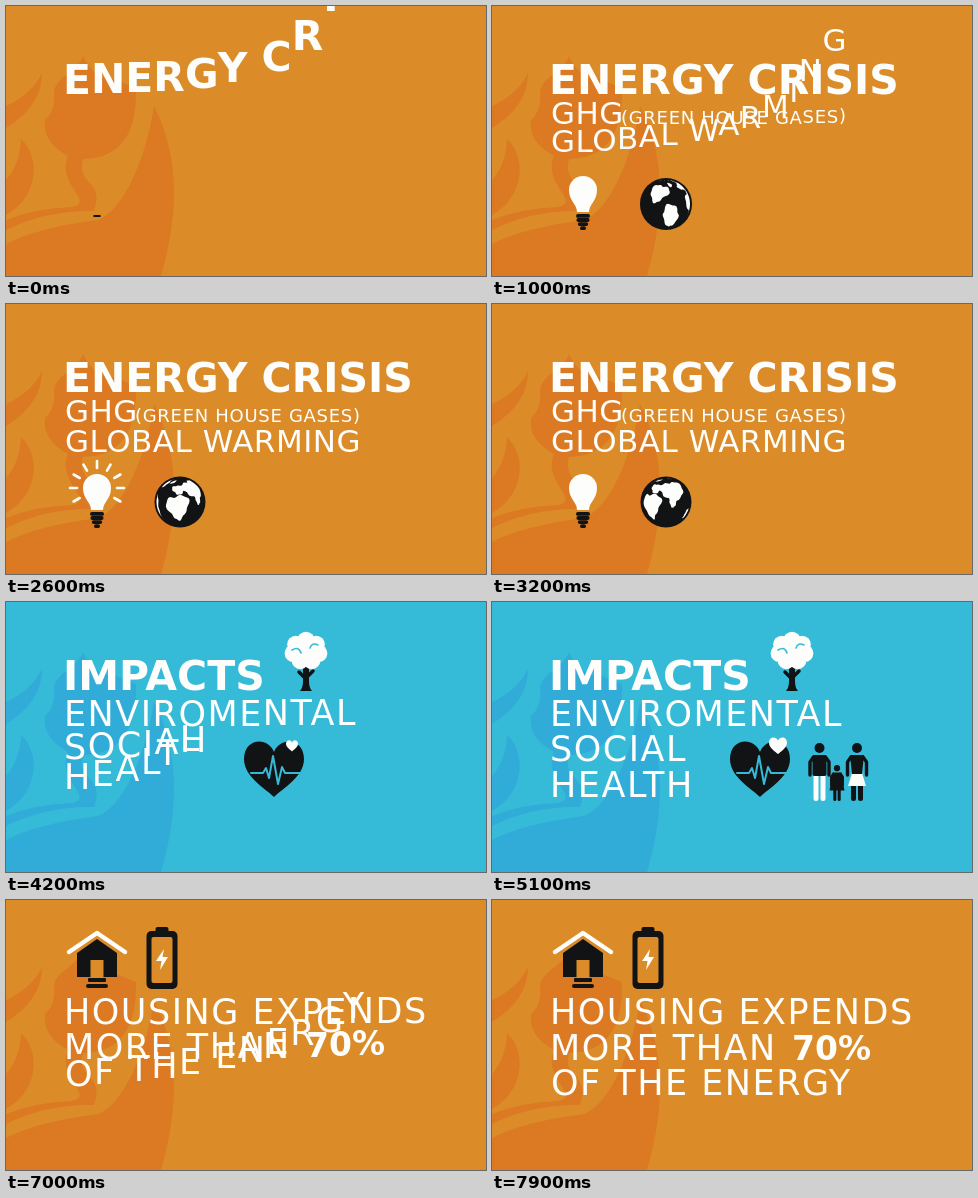
These frames come from a looping animation (480 px wide and 270 px high, 8 s). An HTML page with a canvas:

```html
<!DOCTYPE html>
<html lang="en">
<head>
<meta charset="utf-8">
<title>Energy crisis</title>
<style>
html, body { margin: 0; width: 100%; height: 100%; overflow: hidden; background: #db8c28; }
canvas { display: block; width: 480px; height: 270px; }
</style>
</head>
<body>
<canvas id="stage" width="480" height="270"></canvas>
<script>
const ctx = document.getElementById('stage').getContext('2d');
const LOOP = 8000, CUT_BLUE = 3500, CUT_HOUSE = 6400;
const WHITE = '#fdfdfb', BLACK = '#121314';
const ORANGE = { back: '#db8c28', flame: '#db7a23' };
const BLUE = { back: '#35bad8', flame: '#31acd8' };
const TAU = 70, DROP = 250;

// weight, size, tracking
const TITLE = ['bold', 41, 0], LIST = ['normal', 35, 1.5];
const SUB = ['normal', 31, 0.5], NOTE = ['normal', 18, 0.7], FIGURE = ['bold', 33, 0];

// ---------- helpers ----------
const clamp = v => Math.max(0, Math.min(1, v));

// grows from 0 to 1 with a slight overshoot
function pop(t, start, dur = 350) {
  const p = clamp((t - start) / dur) - 1;
  return 1 + 2.4 * p ** 3 + 1.4 * p ** 2;
}

function scaled(x, y, s, draw) {
  if (s <= 0) return;
  ctx.save();
  ctx.translate(x, y);
  ctx.scale(s, s);
  draw();
  ctx.restore();
}

function fill(d, color) {
  ctx.fillStyle = color;
  ctx.fill(new Path2D(d));
}

function stroke(d, width, color) {
  ctx.strokeStyle = color;
  ctx.lineWidth = width;
  ctx.lineCap = ctx.lineJoin = 'round';
  ctx.stroke(new Path2D(d));
}

function disc(x, y, r, color) {
  ctx.fillStyle = color;
  ctx.beginPath();
  ctx.arc(x, y, r, 0, 7);
  ctx.fill();
}

// box centred on x
function box(x, y, w, h, r, color) {
  ctx.fillStyle = color;
  ctx.beginPath();
  ctx.roundRect(x - w / 2, y, w, h, r);
  ctx.fill();
}

// letters drop in one after another and settle exponentially
function line(t, text, x, y, [weight, size, track], start, gap) {
  ctx.font = `${weight} ${size}px "DejaVu Sans", sans-serif`;
  ctx.fillStyle = WHITE;
  let n = 0;
  [...text].forEach((ch, i) => {
    if (ch === ' ') return;
    const age = t - start - gap * n++;
    if (age < 0) return;
    const left = ctx.measureText(text.slice(0, i + 1)).width - ctx.measureText(ch).width;
    ctx.fillText(ch, x + left + i * track, y - DROP * Math.exp(-age / TAU));
  });
}

function backdrop({ back, flame }) {
  ctx.fillStyle = back;
  ctx.fillRect(0, 0, 480, 270);
  fill('M36 67Q36 100 0 122V100Q26 88 36 67Z', flame);
  fill('M15 133C34 150 34 190 0 209V174Q14 158 15 133Z', flame);
  fill('M77 50Q88 74 108 73L130 82Q132 152 77 153C70 180 100 174 88 205Q40 204 0 224V214' +
    'Q30 202 66 201C90 196 50 178 62 150Q36 136 39 114Q50 104 48 86C50 70 70 68 77 50Z', flame);
  fill('M148 100Q184 170 155 270H0V238Q30 222 92 214C118 204 140 152 148 100Z', flame);
}

// ---------- energy scene ----------
function bulb(t) {
  scaled(91, 210, pop(t, 60, 400), () => {
    fill('M-6 -4C-6 -12 -14 -15 -14 -26A14 14 0 0 1 14 -26C14 -15 6 -12 6 -4Z', WHITE);
    if (Math.floor(t / 500) % 2 === 0) return;
    for (let k = -4; k <= 4; k++) {
      const a = k * Math.PI / 6, sx = Math.sin(a), cy = -Math.cos(a);
      stroke(`M${sx * 20} ${cy * 20 - 26}L${sx * 27} ${cy * 27 - 26}`, 2.6, WHITE);
    }
  });
  scaled(91, 210, 0.55 + 0.45 * clamp(t / 250), () => {
    for (let k = 0; k < (t < 60 ? 1 : 4); k++) box(0, k * 4.1 - 2, 14 - k * k * 0.9, 3.8, 1.9, BLACK);
  });
}

// a rough continent: an oval in degrees that narrows toward the south
function land(view, lon, lat, w, h, taper) {
  const rad = Math.PI / 180, tilt = 20 * rad;
  let seen = false;
  ctx.beginPath();
  for (let k = 0; k < 36; k++) {
    const a = k / 36 * 2 * Math.PI;
    const edge = 1 + 0.12 * Math.sin(3 * a + lon) + 0.08 * Math.sin(7 * a + lat);
    const u = (lon - view + w * edge * Math.cos(a) * (1 + taper * Math.sin(a))) * rad;
    const v = (lat + h * edge * Math.sin(a)) * rad;
    const depth = Math.cos(v) * Math.cos(u);
    let x = Math.cos(v) * Math.sin(u);
    let y = Math.cos(tilt) * Math.sin(v) - Math.sin(tilt) * depth;
    if (Math.sin(tilt) * Math.sin(v) + Math.cos(tilt) * depth > 0) seen = true;
    else {
      const r = Math.hypot(x, y);
      x /= r;
      y /= r;
    }
    ctx.lineTo(x * 23.5, -y * 23.5);
  }
  if (seen) ctx.fill();
}

function globe(t) {
  const view = -18 + (t - 1900) * 0.06;
  scaled(174, 198, pop(t, 700), () => {
    disc(0, 0, 25.5, BLACK);
    ctx.fillStyle = WHITE;
    land(view, 18, 4, 27, 33, 0.4);     // Africa
    land(view, 18, 52, 26, 13, 0.3);    // Europe
    land(view, 88, 50, 55, 25, 0.2);    // Asia
    land(view, 78, 18, 9, 14, 0.6);     // India
    land(view, 134, -25, 19, 13, 0);    // Australia
    land(view, -100, 46, 36, 24, 0.5);  // North America
    land(view, -60, -18, 19, 34, 0.5);  // South America
    land(view, -42, 72, 15, 9, 0.4);    // Greenland
  });
}

function energy(t) {
  backdrop(ORANGE);
  bulb(t);
  globe(t);
  line(t, 'ENERGY CRISIS', 57, 88, TITLE, -437, 45);
  line(t, 'GHG', 59, 118, SUB, 200, 24);
  line(t, '(GREEN HOUSE GASES)', 129, 118, NOTE, 272, 24);
  line(t, 'GLOBAL WARMING', 59, 148, SUB, 650, 24);
}

// ---------- impacts scene ----------
const HEART = 'M0 27C-8 19 -30 7 -30 -11C-30 -32 -6 -34 0 -18C6 -34 30 -32 30 -11C30 7 8 19 0 27Z';

function tree(t) {
  scaled(300, 89, pop(t, CUT_BLUE + 100), () => {
    stroke('M0 -12L-7 -19M0 -13L7 -20', 3.5, BLACK);
    fill('M-6 0Q-3 -3 -3 -10V-26H3V-10Q3 -3 6 0Z', BLACK);
    for (let k = 0; k < 7; k++) {
      const a = k / 7 * 2 * Math.PI;
      disc(13 * Math.sin(a), -40 - 10.5 * Math.cos(a), 8.7, WHITE);
    }
    disc(0, -40, 10, WHITE);
    stroke('M-14 -41Q-7 -45 -5 -38M4 -43Q6 -49 12 -46', 1.6, BLUE.back);
  });
}

function heart(t) {
  const phase = (t - 3650) % 1100 / 1100;
  scaled(268, 168, pop(t, 3850), () => {
    fill(HEART, BLACK);
    ctx.beginPath();
    ctx.rect(-30, -40, 60 * clamp(phase / 0.26), 80);
    ctx.clip();
    stroke('M-23 3H-11L-8 -2L-5 8L-1 -14L4 14L8 -3L11 3H29', 2, BLUE.back);
  });
  scaled(286, 144, 0.3 * pop(t, 4116, 420), () => fill(HEART, WHITE));
}

// legs, arms and trunk differ; the head sits above the shoulders
function person(t, x, start, size, legColor, body) {
  scaled(x, 199, size * pop(t, start), () => {
    stroke('M-3.5 -24V-2.5M3.5 -24V-2.5', 5, legColor);
    stroke('M-6 -44L-9.5 -39V-26M6 -44L9.5 -39V-26', 3.4, BLACK);
    body();
    disc(0, -53, 5, BLACK);
  });
}

function family(t) {
  person(t, 327.5, 4450, 1, WHITE, () => box(0, -46, 14, 21, 2, BLACK));
  person(t, 365, 4600, 1, BLACK, () => {
    fill('M-5 -28H5L9 -15H-9Z', WHITE);
    fill('M-7 -46H7L5 -27H-5Z', BLACK);
  });
  person(t, 345, 4750, 0.62, BLACK, () => fill('M-7 -46H7L12 -17H-12Z', BLACK));
}

function impacts(t) {
  backdrop(BLUE);
  tree(t);
  heart(t);
  family(t);
  line(t, 'IMPACTS', 57, 88, TITLE, CUT_BLUE, 20);
  line(t, 'ENVIROMENTAL', 58, 124, LIST, 3610, 20);
  line(t, 'SOCIAL', 58, 159, LIST, 3855, 24);
  line(t, 'HEALTH', 58, 195, LIST, 3960, 24);
}

// ---------- housing scene ----------
function house(t) {
  scaled(91, 60, pop(t, CUT_HOUSE), () => {
    fill('M0 -21L20 -7V17H-20V-7Z', BLACK);
    box(0, 0, 13, 19, 0, ORANGE.back);
    box(0, 18, 18, 4, 1, BLACK);
    box(0, 24, 22, 4, 2, BLACK);
    stroke('M-28 -8L0 -27L28 -8', 4.5, WHITE);
  });
}

function battery(t) {
  scaled(156, 60, pop(t, CUT_HOUSE + 100), () => {
    box(0, -33, 13, 6, 2, BLACK);
    box(0, -29, 31, 58, 5, BLACK);
    box(0, -23, 21, 46, 2, ORANGE.back);
    fill('M2 -11L-6 1H-0.5L-2 10L6 -3H0.5Z', WHITE);
  });
}

function housing(t) {
  backdrop(ORANGE);
  house(t);
  battery(t);
  line(t, 'HOUSING EXPENDS', 58, 124, LIST, CUT_HOUSE, 15);
  line(t, 'MORE THAN', 58, 160, LIST, 6570, 15);
  line(t, '70%', 300, 160, FIGURE, 6690, 15);
  line(t, 'OF THE ENERGY', 59, 195, LIST, 6768, 15);
}

function draw(now) {
  const t = now % LOOP;
  (t < CUT_BLUE ? energy : t < CUT_HOUSE ? impacts : housing)(t);
}

let origin;
function tick(now) {
  origin ??= now;
  draw(now - origin);
  requestAnimationFrame(tick);
}
draw(0);
requestAnimationFrame(tick);
</script>
</body>
</html>
```
